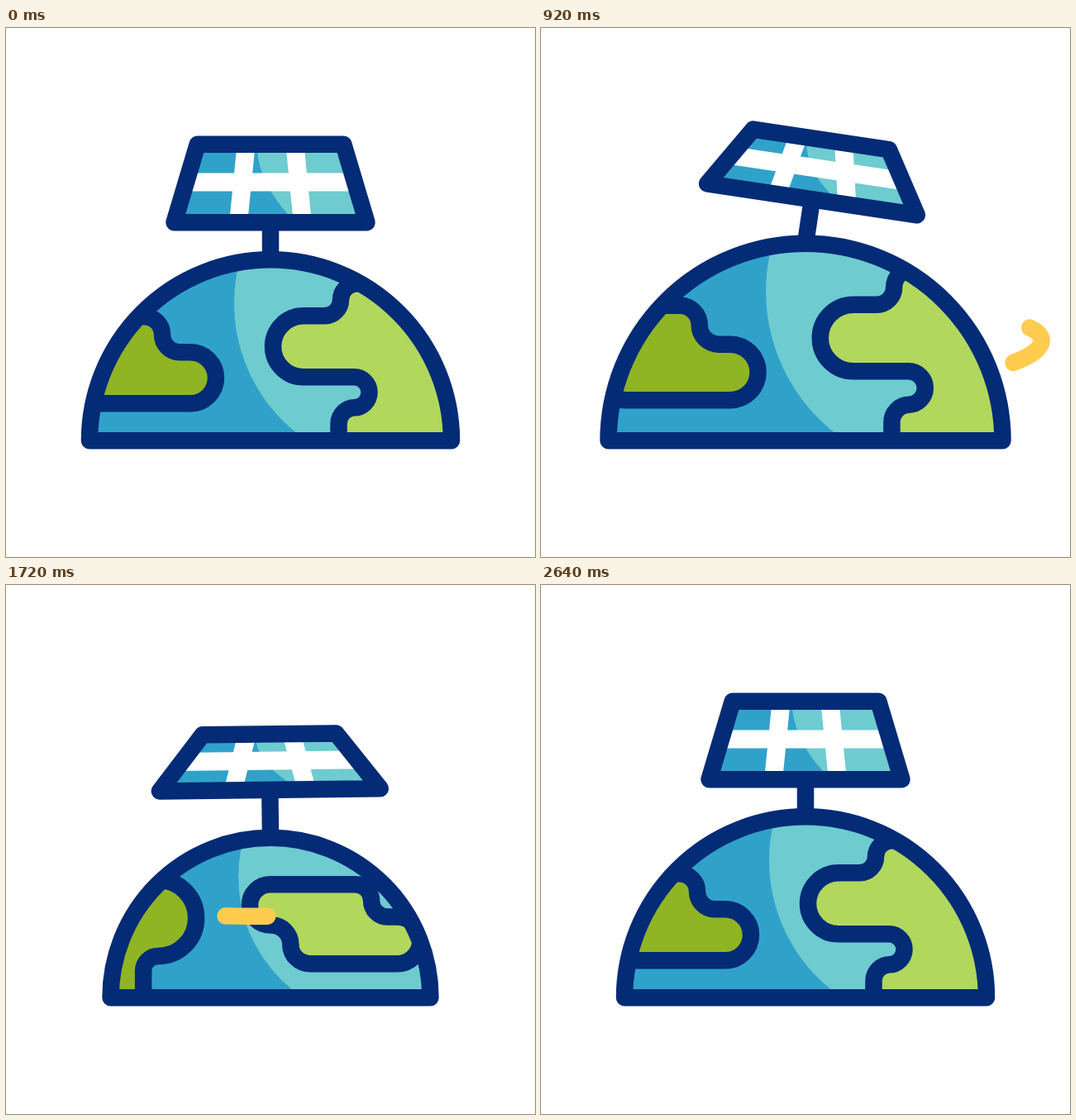
Write an HTML page with a canvas that moves like this. It is 640 px wide and 640 px high and loops after 3 s.

```html
<!DOCTYPE html>
<html lang="en">
<head>
<meta charset="utf-8">
<title>Solar globe</title>
<style>
  html, body { margin: 0; width: 100%; height: 100%; overflow: hidden; background: #fff; }
  canvas { display: block; width: 640px; height: 640px; }
</style>
</head>
<body>
<canvas id="stage" width="640" height="640"></canvas>
<script>
const ctx = document.getElementById('stage').getContext('2d');
const SIZE = 640, LOOP = 3000, CX = 320, BASE = 499.3;
const REST = 219, MAP_PERIOD = 667, LINE = 20.5, GRID_LINE = 22, FOOT_RADIUS = 19.5;
const NAVY = '#042b76', BLUE = '#30a2ca', TEAL = '#6ecbd0',
      MOSS = '#8fb424', LIME = '#b1d75d', YELLOW = '#ffcc50', WHITE = '#fff';

// Sine ease from 0 to 1 between two times.
function ease(t, start, end) {
  const x = Math.min(1, Math.max(0, (t - start) / (end - start)));
  return (1 - Math.cos(Math.PI * x)) / 2;
}

// The globe swells, shrinks, then settles.
const radius = t => REST + 19.5 * ease(t, 200, 720) - 46 * ease(t, 1169, 1777) + 26.5 * ease(t, 1940, 2600);
const mapScale = t => 1 + .09 * ease(t, 200, 800) - .18 * ease(t, 1169, 1777) + .09 * ease(t, 1940, 2600);

// A short wind-up to the right, then one full turn to the left.
const spin = t => 62 * ease(t, 200, 520) - 45 * ease(t, 600, 1060) - (MAP_PERIOD + 17) * ease(t, 775, 2427);

const tilt = t => 8.8 * ease(t, 200, 720) - 16.8 * ease(t, 880, 1340)
  + 13.2 * ease(t, 1400, 2000) - 5.2 * ease(t, 2120, 2600);
const recline = t => ease(t, 200, 1240) - ease(t, 1760, 2380);

// Each vertical edge is [x, end height]; it begins at the height where the previous one ended.
const continents = [
  [[-131, -107], [-66, -45], [-238, -96], [-292, -150]],
  [[85, -190], [175, -156], [304, -55], [234, 40], [82.5, -40], [119.5, -77], [3, -151]]
];

function outline(edges, scale, shift) {
  const path = new Path2D(), count = edges.length;
  const px = x => CX + (x + shift) * scale, py = y => BASE + y * scale;
  const [lastX, firstY] = edges[count - 1];
  path.moveTo(px((lastX + edges[0][0]) / 2), py(firstY));
  let from = firstY;
  edges.forEach(([x, to], i) => {
    const grounded = Math.max(from, to) > 0;
    const r = scale * (grounded ? FOOT_RADIUS : Math.abs(to - from) / 2);
    const nextX = edges[(i + 1) % count][0];
    path.arcTo(px(x), py(from), px(x), py(to), r);
    path.arcTo(px(x), py(to), px(nextX), py(to), r);
    from = to;
  });
  path.closePath();
  return path;
}

function stroke(path, color, width = LINE) {
  ctx.lineWidth = width;
  ctx.strokeStyle = color;
  ctx.stroke(path);
}

function segment(x0, y0, x1, y1, color, width) {
  const path = new Path2D();
  path.moveTo(x0, y0);
  path.lineTo(x1, y1);
  stroke(path, color, width);
}

function drawGlobe(t) {
  const r = radius(t), k = r / REST;
  const dome = new Path2D();
  dome.arc(CX, BASE, r, Math.PI, 2 * Math.PI);
  dome.closePath();
  const light = new Path2D();
  light.arc(CX + 156 * k, BASE - 166 * k, 200 * k, 0, 2 * Math.PI);
  const lands = [0, MAP_PERIOD].flatMap(offset =>
    continents.map(edges => outline(edges, mapScale(t), spin(t) + offset)));

  const paint = (sea, land) => {
    ctx.fillStyle = sea;
    ctx.fillRect(0, 0, SIZE, SIZE);
    ctx.fillStyle = land;
    lands.forEach(path => ctx.fill(path));
  };
  ctx.save();
  ctx.clip(dome);
  paint(BLUE, MOSS);
  ctx.save();
  ctx.clip(light);
  paint(TEAL, LIME);
  ctx.restore();
  lands.forEach(path => stroke(path, NAVY));
  ctx.restore();
  stroke(dome, NAVY);
}

function drawPanel(t) {
  const lean = recline(t), spread = Math.pow(lean, 1.5);
  const height = 94.5 - 27 * lean;
  const bottom = -45 - 13 * spread, top = bottom - height;
  const halfTop = 88.3 - 7.6 * spread, halfBottom = 116.5 + 17 * spread;

  ctx.lineCap = 'butt';
  segment(0, 0, 0, bottom, NAVY);

  const frame = new Path2D();
  frame.moveTo(-halfTop, top);
  frame.lineTo(halfTop, top);
  frame.lineTo(halfBottom, bottom);
  frame.lineTo(-halfBottom, bottom);
  frame.closePath();

  ctx.save();
  ctx.clip(frame);
  ctx.fillStyle = BLUE;
  ctx.fillRect(-150, top, 300, height);
  ctx.fillStyle = TEAL;
  ctx.beginPath();
  ctx.moveTo(-16, top);
  ctx.lineTo(-16, top + 10);
  ctx.quadraticCurveTo(-11, top + height * .524, 21, bottom - 10);
  ctx.lineTo(30, bottom);
  ctx.lineTo(150, bottom);
  ctx.lineTo(150, top);
  ctx.fill();
  const middle = top + height / 2 - 1.5;
  segment(-150, middle, 150, middle, WHITE, GRID_LINE);
  for (const side of [-1, 1]) {
    segment(side * halfTop / 3, top, side * halfBottom / 3, bottom, WHITE, GRID_LINE);
  }
  ctx.restore();
  stroke(frame, NAVY);
}

function drawRays(t) {
  const head = ease(t, 1100, 1300), tail = ease(t, 1300, 1500);
  if (head - tail < .01) return;
  ctx.lineCap = 'round';
  for (const side of [-1, 0, 1]) {
    const x = 64 * side, y = side ? -170 : -181;
    const dx = 21 * side, dy = side ? -30 : -36;
    segment(x + dx * tail, y + dy * tail, x + dx * head, y + dy * head, YELLOW);
  }
}

// Shows the part of a path between two fractions of its length.
function drawTrail(path, length, tail, head) {
  if (head - tail < .002) return;
  ctx.save();
  ctx.lineCap = 'round';
  ctx.setLineDash([(head - tail) * length, 2 * length]);
  ctx.lineDashOffset = -tail * length;
  stroke(path, YELLOW);
  ctx.restore();
}

function drawTrails(t) {
  const k = radius(t) / REST;
  const at = (...v) => v.map((n, i) => (i % 2 ? BASE : CX) + n * k);

  const orbit = new Path2D();
  orbit.moveTo(...at(249, -125.5));
  orbit.bezierCurveTo(...at(271, -116, 268, -98, 223, -84));
  orbit.bezierCurveTo(...at(180, -70, 110, -62, 40, -62));
  orbit.lineTo(...at(-40, -62));
  drawTrail(orbit, 325 * k, ease(t, 1020, 1700), ease(t, 690, 1490));

  const streak = new Path2D();
  streak.moveTo(...at(168, -131));
  streak.bezierCurveTo(...at(110, -119, 40, -109, -62, -112));
  drawTrail(streak, 231 * k, ease(t, 1320, 1920), ease(t, 1120, 1560));
}

function draw(t) {
  ctx.fillStyle = WHITE;
  ctx.fillRect(0, 0, SIZE, SIZE);
  ctx.lineJoin = 'round';

  ctx.save();
  ctx.translate(CX, BASE - radius(t));
  ctx.rotate(tilt(t) * Math.PI / 180);
  drawPanel(t);
  drawRays(t);
  ctx.restore();

  drawGlobe(t);
  drawTrails(t);
}

const began = performance.now();
function tick() {
  draw((performance.now() - began) % LOOP);
  requestAnimationFrame(tick);
}
tick();
</script>
</body>
</html>
```
